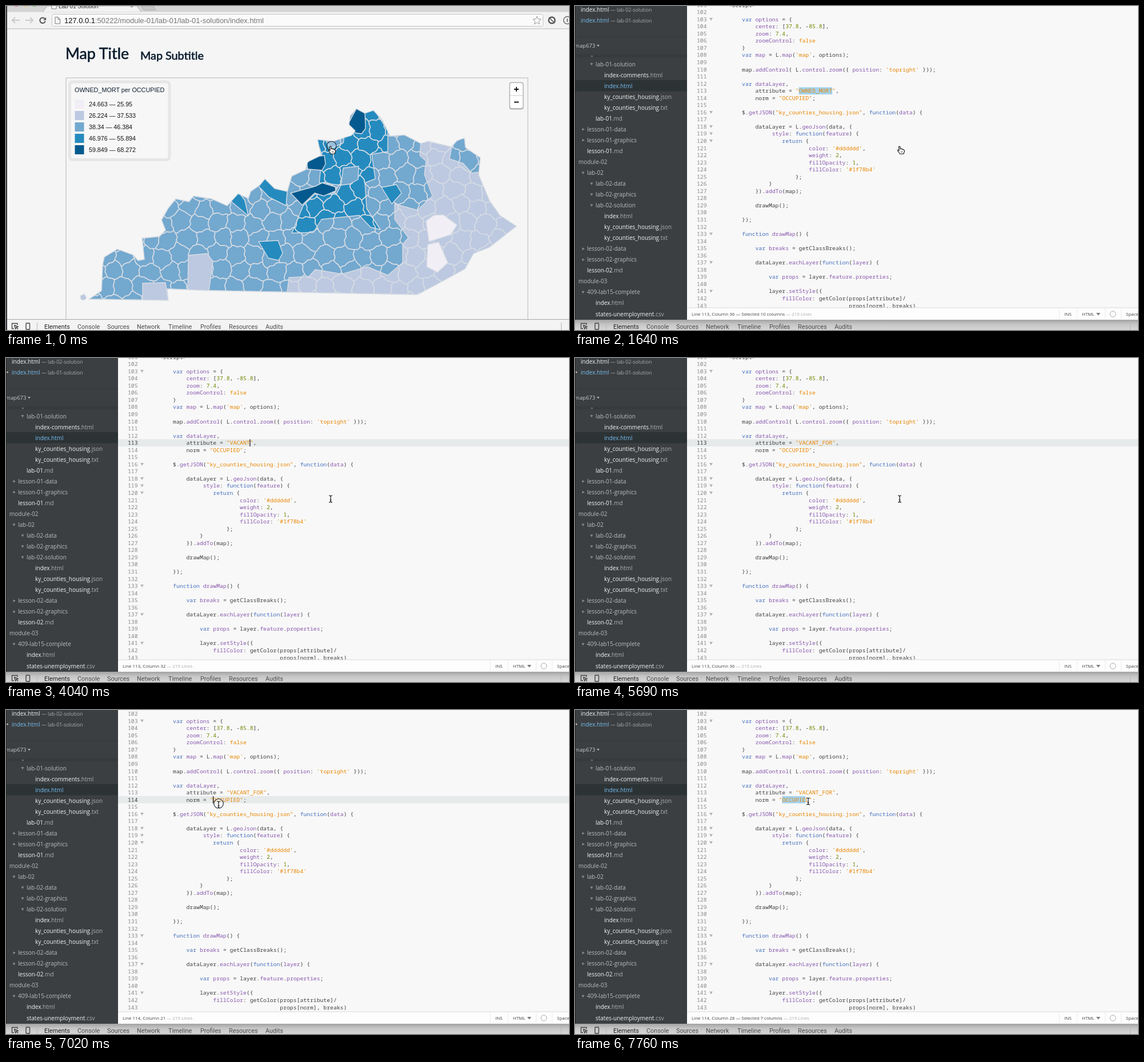
An HTML page that plays this animation: 985 by 568 pixels, repeating every 8000 ms.

```html
<!DOCTYPE html>
<html>
<head>
<meta charset="utf-8">
<style>
html, body { margin: 0; width: 100%; height: 100%; overflow: hidden; background: #f5f5f5; }
svg { display: block; width: 985px; height: 568px; }
.ui { font-family: "Liberation Sans", Arial, sans-serif; }
.head { font-family: Lato, sans-serif; stroke: #0b1c2e; stroke-width: .6px; }
.side { font-family: "Open Sans", "Noto Sans", sans-serif; }
.code { font-family: "Noto Sans Mono", "DejaVu Sans Mono", monospace; font-weight: 500; }
.tool { font-family: Roboto, sans-serif; }
</style>
</head>
<body>
<svg id="stage" viewBox="0 0 985 568"></svg>
<script>
const stage = document.getElementById('stage');
const rect = (x, y, w, h, fill, more = '') =>
  `<rect x="${x}" y="${y}" width="${w}" height="${h}" fill="${fill}" ${more}/>`;
const text = (x, y, size, fill, str, cls, more = '') =>
  `<text x="${x}" y="${y}" font-size="${size}" fill="${fill}" class="${cls}" ${more}>${str}</text>`;
const path = (d, stroke, width = 1, fill = 'none', more = '') =>
  `<path d="${d}" stroke="${stroke}" stroke-width="${width}" fill="${fill}" ${more}/>`;
const span = (fill, str, more = '') => `<tspan fill="${fill}" ${more}>${str}</tspan>`;
const circle = (x, y, r, fill, more = '') => `<circle cx="${x}" cy="${y}" r="${r}" fill="${fill}" ${more}/>`;

// ---- choropleth map: shaded regions under a mesh of random counties ----
const shades = ['#f1eef6', '#bdc9e1', '#73a8cf', '#258bbf', '#045a8e'];
const border = `145,514 167,499 169,453 172,440 195,426 222,436 231,446 242,444 238,407 268,404 279,393
  272,375 284,354 297,338 320,343 328,333 360,338 387,350 406,329 424,337 428,325 444,314 453,303 470,320
  492,325 500,298 524,287 528,273 551,262 545,234 572,237 604,227 611,219 600,208 602,193 613,180 628,188
  643,183 658,199 672,228 697,226 726,241 739,237 779,247 789,236 802,231 804,248 830,266 827,296 846,341
  864,367 893,386 846,423 818,434 803,461 750,490 720,506 560,503 360,499 282,496 284,516`;
const regions = [
  [1, `726,235 780,246 776,268 800,276 815,293 835,290 900,386 780,520 491,510 495,476 530,474 541,462 588,470
    632,457 668,472 694,450 694,418 704,406 680,374 680,347 720,358 746,333 732,295 735,272 724,262`],
  [3, `543,234 557,232 568,250 590,240 592,228 611,222 622,180 643,180 668,218 668,255 640,260 646,303 628,310
    631,355 655,392 638,388 618,367 552,374 538,397 500,398 520,350 540,330 578,330 586,314 548,310 553,262`],
  [2, '590,284 617,281 616,304 602,312 586,314'],
  [1, '239,486 279,485 284,516 239,516'],
  [1, '319,437 352,434 362,448 355,499 318,498'],
  [3, '442,413 476,411 484,433 477,446 459,442'],
  [3, '391,340 406,325 418,341 424,368'],
  [3, '444,307 453,300 492,325 490,350 460,335 442,316'],
  [3, '657,318 683,313 692,328 675,347'],
  [4, '613,180 628,188 629,215 622,224 608,222 598,208'],
  [4, '526,275 541,264 557,262 559,277 553,288 528,286'],
  [4, '498,328 541,316 553,310 576,317 577,324 556,333 540,328 518,349'],
  [0, '735,377 748,367 765,366 789,384 778,401 740,413'],
  [0, '738,418 757,414 773,450 755,467 736,457']
];
let seed = 7;
const random = () => (seed = seed * 16807 % 2147483647) / 2147483647 - .5;
const sites = [];
for (let row = 0; row < 13; row++)
  for (let col = 0; col < 25; col++)
    sites.push([125 + 32 * (col + row % 2 / 2) + 15 * random(), 185 + 28 * row + 13 * random()]);

// Voronoi cell of a site: the map area cut by every bisector.
function cell(p) {
  let poly = [[100, 150], [920, 150], [920, 530], [100, 530]];
  for (const q of sites) {
    if (q === p) continue;
    const [dx, dy] = [q[0] - p[0], q[1] - p[1]];
    const side = ([x, y]) => (x - p[0] - dx / 2) * dx + (y - p[1] - dy / 2) * dy;
    poly = poly.flatMap((a, i) => {
      const b = poly[(i + 1) % poly.length], da = side(a), db = side(b), k = da / (da - db);
      const kept = da <= 0 ? [a] : [];
      if ((da <= 0) !== (db <= 0)) kept.push([a[0] + k * (b[0] - a[0]), a[1] + k * (b[1] - a[1])]);
      return kept;
    });
  }
  return poly;
}
// County lines wind a little.
function wind(poly) {
  return poly.flatMap((a, i) => {
    const b = poly[(i + 1) % poly.length];
    const n = Math.ceil(Math.hypot(b[0] - a[0], b[1] - a[1]) / 5);
    return Array.from({ length: n }, (_, j) => {
      const x = a[0] + (b[0] - a[0]) * j / n, y = a[1] + (b[1] - a[1]) * j / n;
      return [(x + 1.3 * Math.sin(y * .42 + x * .13)).toFixed(1), (y + 1.3 * Math.sin(x * .45 - y * .1)).toFixed(1)];
    });
  });
}
const polygon = (pts, fill, width = 1.4) =>
  `<polygon points="${pts}" fill="${fill}" stroke="#d6dce3" stroke-width="${width}" stroke-linejoin="round"/>`;
const fills = regions.map(([shade, pts]) => polygon(pts, shades[shade]));
const map = `<clipPath id="state"><polygon points="${border}"/></clipPath>
  <g clip-path="url(#state)">${polygon(border, shades[2])}${fills.slice(0, 2).join('')}
  ${sites.map(p => polygon(wind(cell(p)).join(' '), 'none')).join('')}${fills.slice(2).join('')}</g>
  ${polygon(border, 'none', 1.3)}${polygon('130,508 137,505 141,512 136,516 131,514', shades[1], 1)}`;

// ---- browser ----
const ranges = ['24.663 — 25.95', '26.224 — 37.533', '38.34 — 46.384', '46.976 — 55.894', '59.849 — 68.272'];
const reload = (x, y, r, color) => path(`M${x + r * .8} ${y - r * .6}A${r} ${r} 0 1 0 ${x + r} ${y + 1.5}`, color, 2) +
  path(`M${x + r + 1.3} ${y - r - .5}v5h-5z`, 'none', 0, color);
const browser = rect(0, 0, 985, 568, '#f5f5f5') + rect(0, 0, 985, 11, '#d4d4d4') +
  ['#ee5f57', '#f0b72f', '#3fc24a'].map((fill, i) => circle(18 + 16 * i, -5, 6, fill)).join('') +
  path('M64 11L72 0H229L237 11z', '#aaa', 1, '#f2f2f2') + path('M236 0L241 7H262L258 0z', '#aaa', 1, '#c6c6c6') +
  rect(0, 10.5, 985, 29, '#f2f2f2') + rect(0, 39.5, 985, 1, '#b9b9b9') +
  path('M80 -4v9h8v-9', '#777', 1, '#fff') + text(92, 3.6, 10, '#333', 'Lab 01 Solution', 'ui') +
  text(217, 4, 10, '#666', '×', 'ui') +
  path('M24 25H11M16 20L11 25L16 30M34 25H47M42 20L47 25L42 30', '#cbcbcb', 2) + reload(64, 25, 4.8, '#555') +
  rect(80.5, 14.5, 859, 21, '#fafafa', 'rx="3" stroke="#c4c4c4"') +
  path('M86 19.5h5l3.5 3.5v8h-8.5zM91 19.5v4h3.5', '#777') +
  text(102, 29.5, 12.95, '#777', span('#111', '127.0.0.1') + ':50222/module-01/lab-01/lab-01-solution/index.html', 'ui') +
  path('M929 18l2.1 4.9 5.1.4-3.9 3.4 1.2 5.1-4.5-2.8-4.5 2.8 1.2-5.1-3.9-3.4 5.1-.4z', '#999') +
  circle(955, 25, 5.5, 'none', 'stroke="#555" stroke-width="2.4"') + path('M950 20l10 10', '#555', 1.6) +
  circle(982, 25, 6.5, 'none', 'stroke="#666" stroke-width="1.4"') + rect(981.3, 22, 1.6, 6, '#666') +
  text(104, 93, 26.8, '#0b1c2e', 'Map Title', 'head') + text(235, 94, 19.8, '#0b1c2e', 'Map Subtitle', 'head') +
  path('M105 549V126H913V549', '#ccc', 1.5) + map +
  rect(111.5, 133, 174.5, 136.5, '#f7f7f7', 'rx="5" stroke="#e6e6e6" stroke-width="5"') +
  text(120, 151, 10.8, '#0b1c2e', 'OWNED_MORT per OCCUPIED', 'ui') +
  ranges.map((label, i) => rect(120.5, 164, 16, 16, shades[i], `transform="translate(0 ${20 * i})"`) +
    text(145, 175.6 + 20 * i, 10.7, '#111', label, 'ui')).join('') +
  rect(880.5, 133.5, 25, 48, '#b4b4b4', 'rx="4"') + rect(882, 135, 22, 44, '#fff', 'rx="3"') +
  rect(882, 156.5, 22, 1, '#ccc') + path('M889 146h8M893 142v8M889 168.5h8', '#111', 1.8) +
  rect(0, 0, 2, 568, '#33363a') + rect(2, 549, 983, 19, '#f3f3f3') + rect(2, 549, 983, 1, '#a8a8a8');

// ---- editor ----
const CH = 5.85, COL0 = 245.3;
const lineY = n => 23.3 + (n - 103) * 12.545;
const colX = c => COL0 + c * CH;
const source = `    <script>

        var options = {
            center: [37.8, -85.8],
            zoom: 7.4,
            zoomControl: false
        }
        var map = L.map('map', options);

        map.addControl( L.control.zoom({ position: 'topright' }));

        var dataLayer,

            norm = "OCCUPIED";

        $.getJSON("ky_counties_housing.json", function(data) {

            dataLayer = L.geoJson(data, {
                 style: function(feature) {
                    return {
                            color: '#dddddd',
                            weight: 2,
                            fillOpacity: 1,
                            fillColor: '#1f78b4'
                        };
                }
            }).addTo(map);

            drawMap();

        });

        function drawMap() {

            var breaks = getClassBreaks();

            dataLayer.eachLayer(function(layer) {

                var props = layer.feature.properties;

                layer.setStyle({
                    fillColor: getColor(props[attribute]/
                                        props[norm], breaks)`.split('\n');
const token = /(["'].*?["']|\bfalse\b)|\b(var|function|return)\b|(\b\d+(?:\.\d+)?)|((?<=\.|var |function |function\()[a-zA-Z]\w*|\w+(?=:))/g;
const inks = ['#e88501', '#446fbd', '#6d8600', '#8757ad'];
const paint = str => str.replace(/</g, '&lt;').replace(token, (m, ...groups) =>
  span(inks[groups.findIndex((g, i) => i < 4 && g)], m));
const codeLine = (n, str) => {
  const body = str.trimStart();
  return text(colX(str.length - body.length), lineY(n) + 3.4, 9.75, '#404040', paint(body), 'code');
};
const number = n => text(230.5, lineY(n) + 3.4, 9.75, '#888', n, 'code', `text-anchor="end" id="n${n}"`);
const code = source.map((str, i) => {
  const n = 101 + i;
  return number(n) + (str ? codeLine(n, str) : '') +
    (/{$/.test(str) || n === 141 ? path(`M235 ${lineY(n) - 2.5}h6l-3 5z`, 'none', 0, '#b5b5b5') : '');
}).join('');

// Sidebar rows: text x, fold mark, name, extension.
const rows = `36 v lab-01-solution|51 - index-comments .html|51 * index .html|51 - ky_counties_housing .json
51 - ky_counties_housing .txt|36 - lab-01 .md|21 > lesson-01-data|21 > lesson-01-graphics|21 - lesson-01 .md
6 v module-02|21 v lab-02|36 v lab-02-data|36 v lab-02-graphics|36 v lab-02-solution|51 - index .html
51 - ky_counties_housing .json|51 - ky_counties_housing .txt|21 > lesson-02-data|21 > lesson-02-graphics
21 - lesson-02 .md|6 v module-03|21 v 409-lab15-complete|36 - index .html|36 - states-unemployment .csv`.split(/[|\n]/);
const blue = '#76bdf0';
const tree = rows.map((row, i) => {
  const [x, mark, name, ext = ''] = row.split(' '), y = 102 + 19.04 * i;
  const tri = mark === 'v' ? `M${x - 9.5} ${y - 2}h5l-2.5 4.5z` : mark === '>' ? `M${x - 8.5} ${y - 2.5}v5l4.5 -2.5z` : '';
  const main = mark === '*' ? blue : ext ? '#f2f2f2' : '#b9bcbe';
  return path(tri, 'none', 0, '#85898b') +
    text(x, y + 3.6, 10, main, name + span(mark === '*' ? blue : '#acb0b2', ext), 'side');
}).join('');
const opened = (y, fill, folder) =>
  text(10, y, 10, fill, 'index.html' + span('#a9adaf', ' — ' + folder, 'font-size="8.8"'), 'side');
const sidebar = rect(0, 0, 196, 550, '#3c3f41') + rect(0, 54, 196, 1, '#36393b') +
  opened(10, '#f2f2f2', 'lab-02-solution') + opened(28.6, blue, 'lab-01-solution') +
  text(-1, 72.5, 9.6, '#c5c8c9', 'map673', 'side') + path('M38 68h5l-2.5 3.5z', 'none', 0, '#aaa') +
  rect(0, 85, 196, 5, '#35383a', 'opacity=".6"') + path('M27 87h5l-2.5 3z', 'none', 0, '#6d7173') +
  rect(0, 130, 196, 19.3, '#2c3335') + tree +
  circle(2.5, 25, 1.4, '#bbb', 'id="dirty"') + rect(0, 0, 1, 550, '#222');
const status = rect(196, 529, 789, 21, '#fdfdfd') + rect(196, 528.5, 789, 1, '#dcdcdc') +
  text(204, 543, 7.95, '#444', '', 'side', 'id="status"') + text(856, 543, 8, '#444', 'INS', 'side') +
  text(887, 543, 8, '#444', 'HTML', 'side') + path('M912 538h7l-3.5 4.5z', 'none', 0, '#777') +
  circle(941, 540, 5, 'none', 'stroke="#aaa"') + text(964, 543, 8, '#444', 'Spaces: 4', 'side') +
  path('M847.5 530v19M878.5 530v19M927.5 530v19M955.5 530v19', '#ececec');
const editor = rect(196, 0, 789, 550, '#f8f8f8') +
  `<clipPath id="pane"><rect x="196" y="0" width="789" height="529"/></clipPath>
  <g clip-path="url(#pane)"><g id="scroll">${rect(196, 0, 789, 12.6, '#e6eaea', 'id="active"')}
  ${rect(0, 0, 0, 12.6, '#a3d3f0', 'id="select"')}${code}<g id="edited"></g>
  ${rect(0, 0, 1.2, 12.6, '#111', 'id="caret"')}</g></g>` + status + sidebar +
  `<linearGradient id="shade" x2="0" y2="1"><stop stop-color="#a2a2a2"/><stop offset=".45" stop-color="#c6c6c6"/>
  <stop offset="1" stop-color="#d6d6d6"/></linearGradient>` + rect(0, 550, 985, 18, 'url(#shade)');

// ---- developer tools strip and pointers ----
const tabs = [[67, 'Elements'], [125, 'Console'], [177, 'Sources'], [229, 'Network'], [284, 'Timeline'],
  [340, 'Profiles'], [390, 'Resources'], [454, 'Audits']];
const strip = tabs.map(([x, name], i) => text(x, 565.7, 10.8, i ? '#4a4a4a' : '#222', name, 'tool')).join('') +
  path('M20 559v-2.5H10.5V565.5H14M14.5 559.5l6.5 2.8-2.6 1 2.6 3.2M14.5 559.5l2.2 6.5 1.7-2.7', '#444', 1.4) +
  rect(35, 556, 6.5, 11, 'none', 'rx="1.2" stroke="#444" stroke-width="1.4"') +
  path('M54.5 555v13M971.5 555v13', '#b5b5b5');
const hand = `<g id="hand" transform="translate(569.5 253)">` +
  path(`M-3 -6.5c1.5-1.2 2.5 0 2.5 1.5v2.5c2-1 3 0 3.2.8 1.5-.6 2.5.2 2.7 1 1.2 0 1.5.8 1.5 2
  0 2-1.5 3-1.5 5h-6.5c-.5-2-3.500-4-4-6.5 .5-1 1.8-.4 2.5.5z`, '#111', 1.1, '#fff') +
  path('M1 1.5v2.5M3 1.5v2.5', '#111', .7) + '</g>';
const beamShape = 'M-3 -6q3 0 3 2q0 -2 3 -2M0 -4V4M-3 6q3 0 3 -2q0 2 3 2M-1.5 2h3';
const beam = `<g id="beam">${path(beamShape, '#fff', 2.6)}${path(beamShape, '#111', 1.2)}</g>`;

stage.innerHTML = `<g id="browser">${browser}</g><g id="editor">${editor}</g>${strip}
  ${circle(0, 0, 8.3, '#fff', 'id="ring" fill-opacity=".25" stroke="#1b2530" stroke-width="1.1"')}${hand}${beam}`;

// ---- timeline ----
const $ = id => document.getElementById(id);
const set = (id, attrs) => Object.entries(attrs).forEach(([k, v]) => $(id).setAttribute(k, v));
const show = (id, on) => set(id, { display: on ? 'inline' : 'none' });
const move = (id, x, y) => set(id, { transform: `translate(${x} ${y})` });
const mix = (a, b, k) => a + (b - a) * k;
const TICK = 148;
const ticks = (t, start, max) => Math.min(max, Math.max(0, Math.floor((t - start) / TICK)));
// Keys fall in short bursts: VAC, ANT, _, FOR.
const keysTyped = t => [[3160, 3], [3750, 3], [4490, 1], [4940, 3]]
  .reduce((sum, [start, keys]) => sum + Math.min(keys, Math.max(0, Math.floor((t - start) / 145) + 1)), 0);
let shown;

function pointer(t) {
  if (t >= 7020) {
    const k = ticks(t, 7020, 5) / 5;
    return [mix(372, 408, k), mix(166, 160, k)];
  }
  const k = (1 - Math.cos(Math.PI * ticks(t, 5980 - TICK, 6) / 6)) / 2;
  return [mix(568, 364, k), mix(247, 163, k)];
}

function draw() {
  const t = performance.now() % 8000;
  const inEditor = t >= 1640, clicked = t >= 7020, pointing = t < 1780;
  const typed = keysTyped(t), line = clicked ? 114 : 113;
  const [px, py] = pointer(t);
  const dragged = ticks(t, 7020, 5) ? Math.floor((px - 362) / CH) : 0;
  const picked = clicked ? dragged : typed ? 0 : 10;
  const start = clicked ? 20 : 25;
  const col = start + (clicked ? picked : typed || 10);
  const word = typed ? 'VACANT_FOR'.slice(0, typed) : 'OWNED_MORT';

  show('browser', !inEditor);
  show('editor', inEditor);
  show('dirty', typed);
  move('scroll', 0, clicked ? -4 : 0);
  if (word !== shown) {
    $('edited').innerHTML = codeLine(113, `            attribute = "${word}",`);
    shown = word;
  }
  const top = lineY(line) - 6.3;
  show('active', !picked);
  set('active', { y: top });
  set('select', { x: colX(start), y: top, width: picked * CH });
  set('caret', { x: colX(col) - .4, y: top });
  show('caret', !picked && (t < 5690 || t >= 6280 && t < 6720 || clicked));
  for (const n of [113, 114]) set('n' + n, { fill: n === line && !picked ? '#333' : '#888' });
  $('status').innerHTML = `Line ${line}, Column ${col + 1}` +
    (picked ? ` — Selected ${picked} column${picked > 1 ? 's' : ''}` : '') + span('#aaa', ' — 219 Lines');

  show('hand', pointing);
  show('beam', !pointing);
  move('beam', px, py);
  show('ring', t < 140 || clicked && !dragged);
  move('ring', clicked ? 372 : 569.5, clicked ? 164 : 245.5);
  requestAnimationFrame(draw);
}
draw();
</script>
</body>
</html>
```
